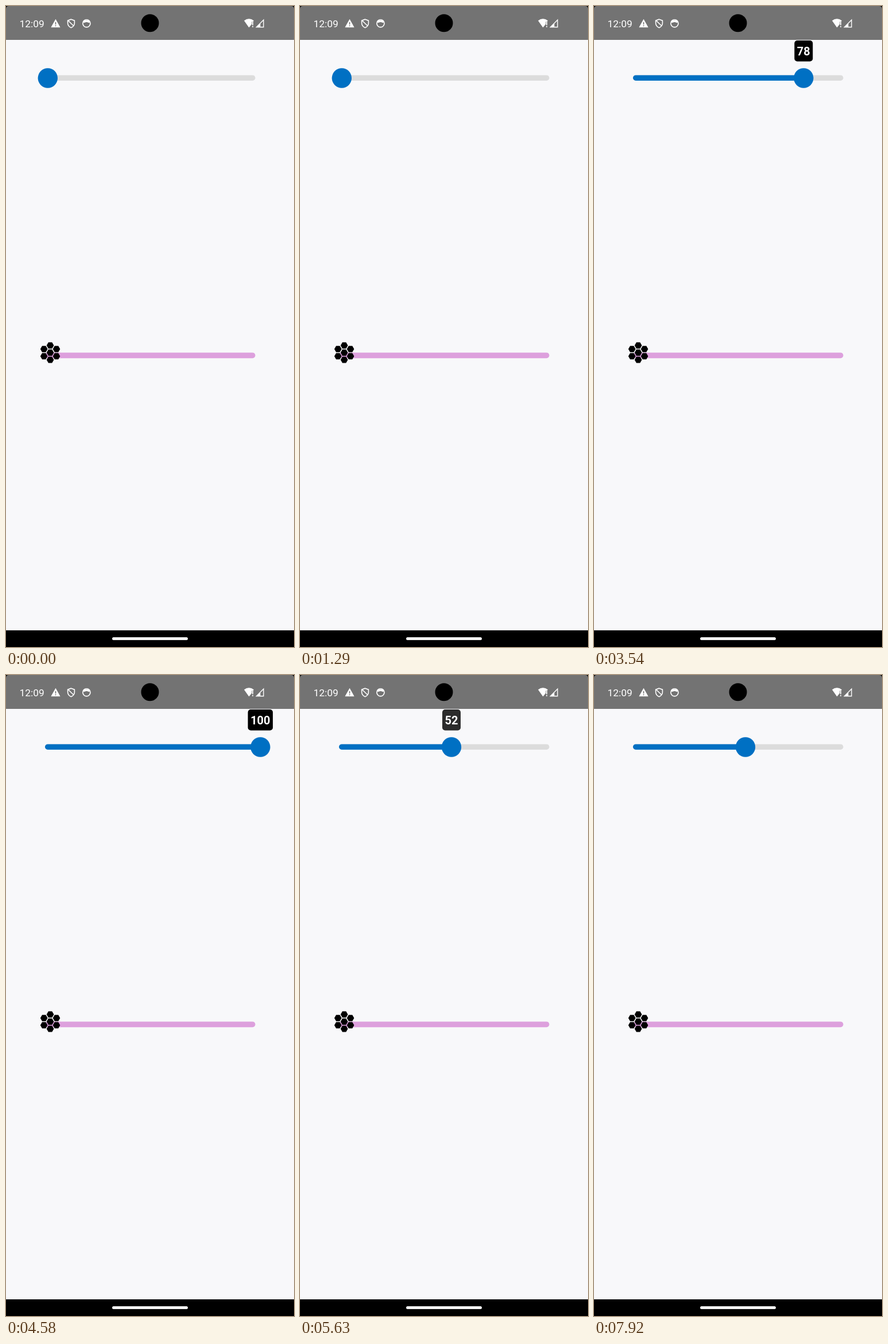
Animation, 502 px wide and 1116 px high, one loop 8 s. Source, as an HTML page:

```html
<!DOCTYPE html>
<html lang="en">
<head>
<meta charset="utf-8">
<title>Sliders</title>
<style>
  html, body { margin: 0; width: 100%; height: 100%; overflow: hidden; background: #f8f8fa; }
  svg { display: block; width: 502px; height: 1116px; }
  text { font-family: Roboto, sans-serif; fill: #fff; }
</style>
</head>
<body>
<svg viewBox="0 0 502 1116">
  <rect width="502" height="1116" fill="#f8f8fa"/>

  <!-- status bar -->
  <rect width="502" height="59" fill="#737373"/>
  <path d="M0 0H5Q0 0 0 5ZM502 0H497Q502 0 502 5Z"/>
  <circle cx="251" cy="29.8" r="15.5"/>
  <text x="23.5" y="36.6" font-size="17.4">12:09</text>
  <g fill="#fff">
    <path d="M86.5 22.8 94.6 37.2H78.4Z"/>
    <path d="M85.7 28h1.6v4.2h-1.6ZM85.7 33.6h1.6v1.7h-1.6Z" fill="#737373"/>
    <path d="M415 25.6Q423.5 19 432 25.6L430.6 27.4H428.4V31.4L423.5 37.4Z"/>
    <path d="M429.2 27.6h1.7v6h-1.7ZM429.2 35h1.7v1.9h-1.7Z"/>
    <path fill-rule="evenodd" d="M449.6 22.6V37.4H434.8ZM448.2 26V36H443.4V30.8Z"/>
  </g>
  <g fill="none" stroke="#fff" stroke-width="1.6">
    <path d="M113.5 23.2 119.4 25.4V30.2Q119 35.4 113.5 37.8 108 35.4 107.6 30.2V25.4ZM108.2 25.2 118.2 35"/>
    <circle cx="140.4" cy="30.3" r="6.6"/>
    <path d="M135 28.2Q140.4 24.6 145.8 28.2" stroke-width="3"/>
  </g>

  <!-- upper slider -->
  <rect x="68" y="120.4" width="366.5" height="9.6" rx="4.8" fill="#dcdcdc"/>
  <g fill="#0070c3">
    <rect id="fill" x="68" y="120.4" height="9.6" rx="4.8"/>
    <circle id="thumb" cy="125.5" r="17.2"/>
  </g>
  <g id="tip">
    <rect id="box" y="60" height="36.5" rx="5"/>
    <text id="label" y="86.3" font-size="20" font-weight="700" text-anchor="middle"></text>
  </g>

  <!-- lower slider -->
  <rect x="68" y="603.4" width="366.5" height="9.8" rx="4.9" fill="#dda0dd"/>
  <path id="comb"/>

  <!-- navigation bar -->
  <rect y="1087" width="502" height="29"/>
  <rect x="185" y="1099" width="132" height="5" rx="2.5" fill="#f4f4f4"/>
</svg>
<script>
const LOOP = 8000, MIN = 72.8, MAX = 443.5;
const $ = id => document.getElementById(id);
const set = (id, attrs) => {
  for (const k in attrs) $(id).setAttribute(k, attrs[k]);
};

// [time, value] steps, linear in between
const drag = [
  [2380, MIN], [2580, 196.3], [2900, 264], [3250, 317],
  [3540, 365.2], [4060, MAX], [4580, MAX],
  [4760, 420], [5000, 352], [5220, 288], [5400, 264]
];
const fade = [[2130, 0], [2250, 1], [5490, 1], [6290, 0]];

function at(steps, t) {
  if (t <= steps[0][0]) return steps[0][1];
  for (let i = 1; i < steps.length; i++) {
    const [t0, a] = steps[i - 1], [t1, b] = steps[i];
    if (t <= t1) return a + (b - a) * (t - t0) / (t1 - t0);
  }
  return steps[steps.length - 1][1];
}

// seven flat-topped hexagons: one in the middle, six around it
function hexagon(x, y) {
  const r = 6.35;
  const points = [0, 1, 2, 3, 4, 5].map(i => {
    const a = i * Math.PI / 3;
    return (x + r * Math.cos(a)).toFixed(2) + " " + (y + r * Math.sin(a)).toFixed(2);
  });
  return "M" + points.join("L") + "Z";
}
let comb = hexagon(77.1, 603.5);
for (let i = 0; i < 6; i++) {
  const a = (i + 0.5) * Math.PI / 3;
  comb += hexagon(77.1 + 12.6 * Math.cos(a), 603.5 + 12.4 * Math.sin(a));
}
$("comb").setAttribute("d", comb);

function draw(t) {
  const x = at(drag, t);
  const percent = (x - MIN) / (MAX - MIN) * 100;
  // the label trails the thumb in both directions
  const value = String(t < 4580 ? Math.floor(percent + 1e-6) : Math.ceil(percent - 1e-6));
  const width = 9 + 11.5 * value.length;
  set("thumb", { cx: x });
  set("fill", { width: Math.min(x, 434.5) - 68 });
  set("tip", { opacity: at(fade, t) });
  set("box", { x: x - width / 2, width });
  set("label", { x });
  if ($("label").textContent !== value) $("label").textContent = value;
}

const start = performance.now();
function tick() {
  draw((performance.now() - start) % LOOP);
  requestAnimationFrame(tick);
}
tick();
</script>
</body>
</html>
```
